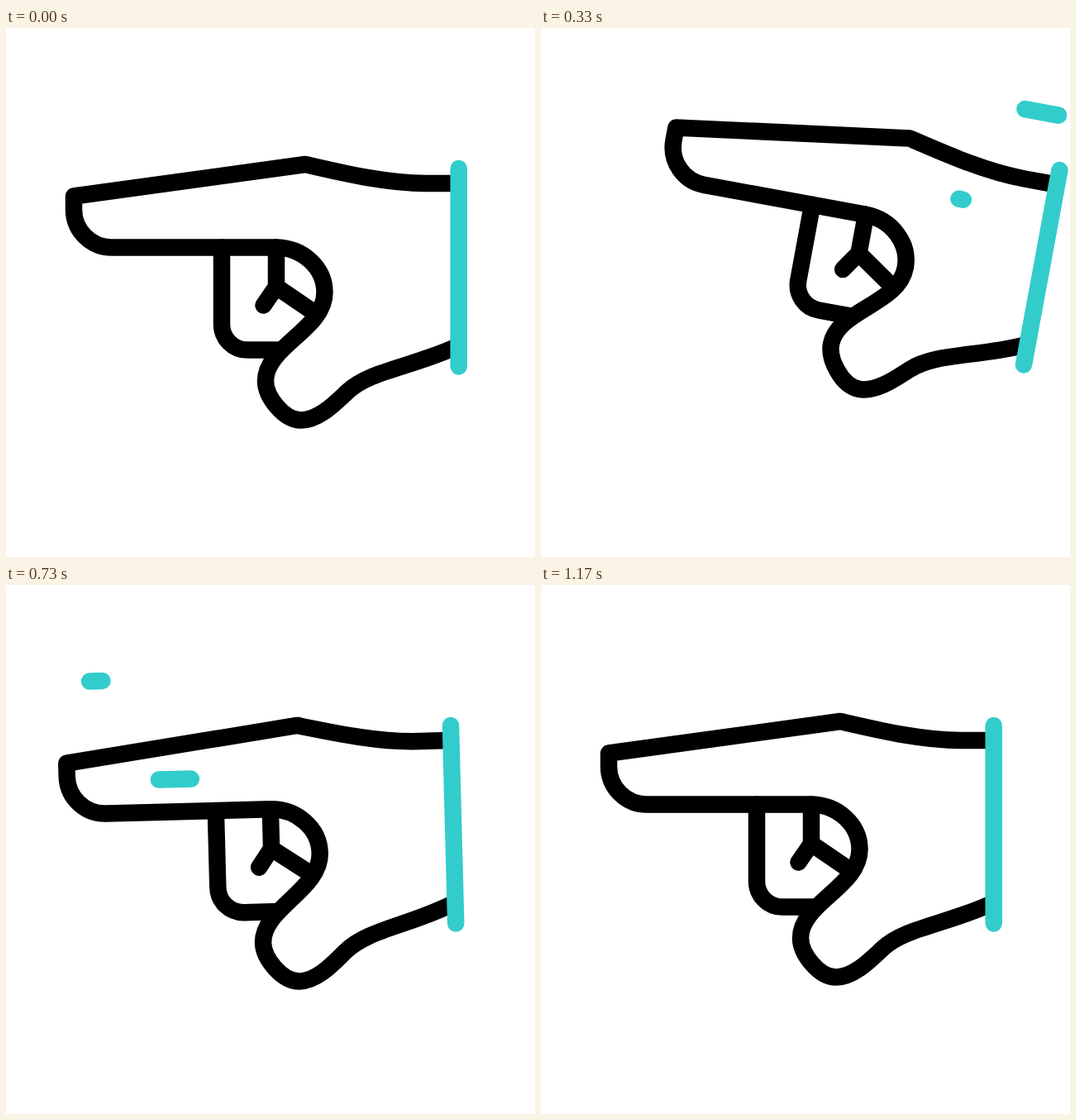
An HTML page for the animation above (1.67 s loop, 640 by 640 pixels).

```html
<!DOCTYPE html>
<html>
<head>
<meta charset="utf-8">
<title>Pointing hand</title>
<style>
  html, body { margin: 0; height: 100%; overflow: hidden; background: #fff; }
  svg { display: block; width: 100%; height: 100%; }
  path { fill: none; stroke: #000; stroke-width: 20.5; stroke-linecap: round; stroke-linejoin: round; }
  .teal { stroke: #33cccc; }
</style>
</head>
<body>
<svg viewBox="0 0 640 640">
  <g id="hand">
    <path d="M261 265.5V358.5A31 31 0 0 0 292 389.5H333M327 265.5V313L311.5 335.5M327 313L371 343"/>
    <path d="M545 188H508C460 188 410 176 362 165L82 203.5V219.5A46 46 0 0 0 128 265.5H326
      C359 265.5 385.5 290 385.5 320C385.5 365 314 385 314 427C314 446 336 474.5 357 474.5
      C379 474.5 400 452 413 440C441 414 490 411 546 385"/>
    <path class="teal" d="M547.7 170V409.5"/>
    <path class="teal" id="upper"/>
    <path class="teal" id="lower"/>
  </g>
</svg>
<script>
const LOOP = 1670, FPS = 30, LAST = 35;
const byId = id => document.getElementById(id);
const hand = byId('hand');

// Pose keys: [frame, shift x, angle]
const keys = [[0, 0, 0], [9.15, 61.4, 10.9], [17, -42.2, -3], [27, 29, 0], [LAST, 0, 0]];

// Speed lines grow leftwards, then their tails catch up
const lines = [
  { el: byId('upper'), y: 105, from: 534.5, to: 112.4, delay: 0 },
  { el: byId('lower'), y: 226.3, from: 439.5, to: 193, delay: 0.9 }
];

function ease(time, start, end) {
  const s = Math.min(1, Math.max(0, (time - start) / (end - start)));
  return s * s * (3 - 2 * s);
}

function pose(time) {
  let i = 0;
  while (i < keys.length - 2 && time > keys[i + 1][0]) i++;
  const [a, b] = [keys[i], keys[i + 1]];
  const p = ease(time, a[0], b[0]);
  return [1, 2].map(k => a[k] + (b[k] - a[k]) * p);
}

function draw(time) {
  const [x, angle] = pose(time);
  hand.setAttribute('transform', `translate(${x} 0) rotate(${angle} 547.7 289.75)`);
  for (const { el, y, from, to, delay } of lines) {
    const head = ease(time - delay, 8.35, 16.85);
    const tail = ease(time - delay, 16.2, 22.75);
    const at = p => from + (to - from) * p;
    el.setAttribute('d', head > tail ? `M${at(tail)} ${y}H${at(head)}` : '');
  }
}

const start = performance.now();
function tick() {
  const ms = (performance.now() - start) % LOOP;
  draw(Math.min(LAST, Math.floor((ms + 3.5) * FPS / 1000)));
  requestAnimationFrame(tick);
}
tick();
</script>
</body>
</html>
```
